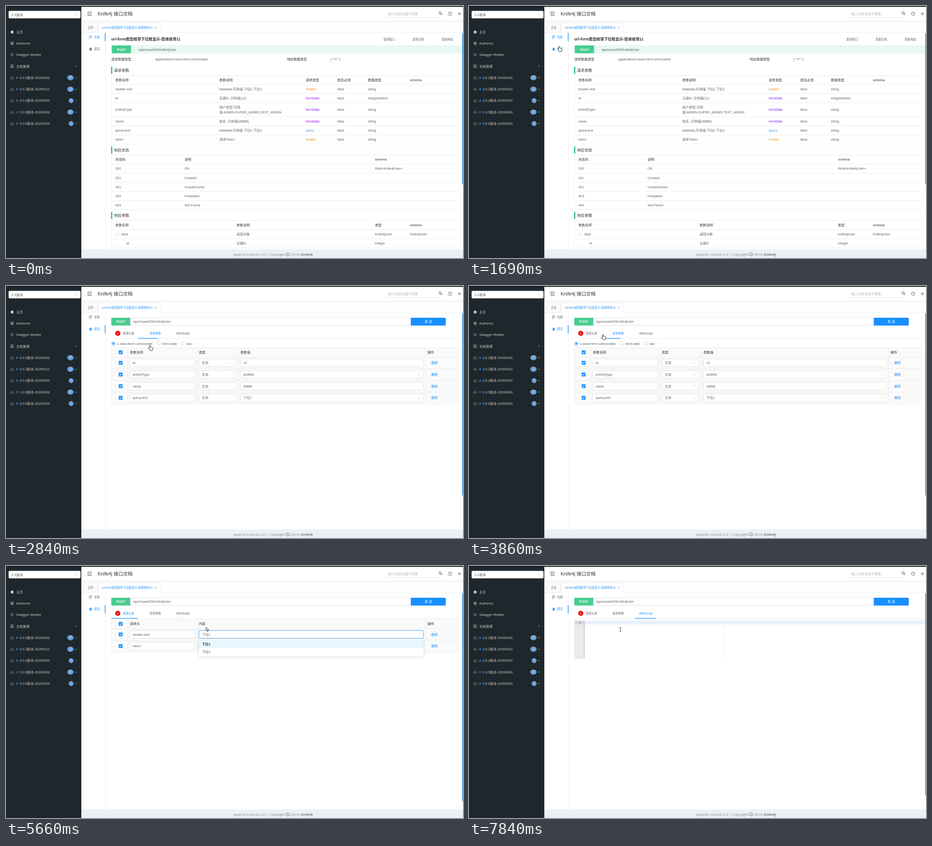
An HTML page with a canvas that plays this animation: 1007 px wide and 556 px high, repeating every 8 s.

```html
<!DOCTYPE html>
<html lang="zh-CN">
<head>
<meta charset="utf-8">
<title>Knife4j 接口文档</title>
<style>
html, body { margin: 0; width: 100%; height: 100%; overflow: hidden; background: #fff; }
canvas { display: block; width: 1007px; height: 556px; }
</style>
</head>
<body>
<canvas id="stage"></canvas>
<script>
const W = 1007, H = 556, LOOP = 8000;
const canvas = document.getElementById('stage');
const dpr = window.devicePixelRatio || 1;
canvas.width = W * dpr;
canvas.height = H * dpr;
const c = canvas.getContext('2d');

const SANS = '"Liberation Sans", "Noto Sans CJK SC", "Noto Sans CJK", sans-serif';
const FOOT = '"Open Sans", "Noto Sans", sans-serif';
const MONO = '"Liberation Mono", monospace';
const BLUE = '#1890ff', TEXT = '#606060', DARK = '#303030', LINE = '#e8e8e8', SIDE = '#c3c9cc';
const BASE = 7.35, SMALL = 6.3;

// Times of the user's actions
const OPEN_DEBUG = 1980, TO_HEADERS = 4225, TO_SCRIPT = 6515;
const DROP_OPEN = 5420, DROP_CLOSE = 6050;

// Pointer path: time, x, y, shape from this point on
const path = [
  [70, 858, 391, 'arrow'], [280, 677, 318, 'arrow'], [440, 640, 300, 'arrow'],
  [1130, 222, 105, 'hand'], [1210, 204, 92, 'hand'], [1370, 203, 83, 'hand'],
  [1530, 199, 89, 'hand'], [1980, 199, 89, 'arrow'], [2600, 310, 128, 'hand'],
  [2760, 318, 131, 'hand'], [2860, 318, 131, 'hand'], [3230, 371, 124, 'hand'],
  [3410, 371, 122, 'hand'], [3960, 279.5, 103.5, 'hand'], [4500, 279.5, 103.5, 'arrow'],
  [4950, 430, 144, 'hand'], [5030, 437, 148, 'hand'], [5500, 437, 148, 'arrow'],
  [5660, 441, 135, 'arrow'], [6100, 400, 117, 'hand'], [6200, 395, 114, 'hand'],
  [6630, 395, 114, 'arrow'], [6740, 385, 121, 'beam'], [7380, 333.5, 140, 'beam']
];

const clamp = v => Math.max(0, Math.min(1, v));
const lerp = (a, b, p) => a + (b - a) * p;
const ease = p => p < .5 ? 4 * p ** 3 : 1 - 4 * (1 - p) ** 3;
const since = (t, start, dur = 300) => ease(clamp((t - start) / dur));

function text(s, x, y, o = {}) {
  const size = o.size || BASE;
  c.font = `${o.weight || 400} ${size}px ${o.font || SANS}`;
  c.fillStyle = o.color || TEXT;
  c.textAlign = o.align || 'left';
  c.fillText(s, x, y + size * .355);
}
function rect(x, y, w, h, color) {
  c.fillStyle = color;
  c.fillRect(x, y, w, h);
}
function box(x, y, w, h, fill, stroke, r = 2, lw = .8) {
  c.beginPath();
  c.roundRect(x, y, w, h, r);
  if (fill) { c.fillStyle = fill; c.fill(); }
  if (stroke) { c.strokeStyle = stroke; c.lineWidth = lw; c.stroke(); }
}
function line(pts, color, lw = .8) {
  c.beginPath();
  for (let i = 0; i < pts.length; i += 2) c.lineTo(pts[i], pts[i + 1]);
  c.strokeStyle = color;
  c.lineWidth = lw;
  c.stroke();
}
function circle(x, y, r, fill, stroke, lw = .8) {
  c.beginPath();
  c.arc(x, y, r, 0, Math.PI * 2);
  if (fill) { c.fillStyle = fill; c.fill(); }
  if (stroke) { c.strokeStyle = stroke; c.lineWidth = lw; c.stroke(); }
}
const hline = (y, x1 = 232, x2 = 1000, color = LINE) => rect(x1, y, x2 - x1, .8, color);
const vline = (x, y1, y2, color = LINE) => rect(x, y1, .8, y2 - y1, color);
function chevron(x, y, color, turn = 0, r = 2.4) {
  const d = r / 2 * Math.cos(turn * Math.PI);
  line([x - r, y - d, x, y + d, x + r, y - d], color, .8);
}
function inPane(dx, draw) {
  c.save();
  c.beginPath();
  c.rect(231.5, 59, 773, 478);
  c.clip();
  c.translate(dx, 0);
  draw();
  c.restore();
}

function docIcon(x, y, color) {
  line([x + 1, y + 3, x - 2.6, y + 3, x - 2.6, y - 3, x + 2.6, y - 3, x + 2.6, y + 1], color);
  line([x - 1, y - 1, x + 1.4, y - 1], color, .7);
  line([x - 1, y + 1, x + 1, y + 1], color, .7);
}
function bugIcon(x, y, color) {
  box(x - 1.7, y - 1.6, 3.4, 4.6, color, null, 1.6);
  circle(x, y - 2, 1.3, color);
  for (const d of [-1, 1, 2.6]) line([x - 3, y + d, x + 3, y + d], color, .7);
}
function cloudIcon(x, y) {
  c.beginPath();
  c.arc(x - 2, y + 1, 1.7, 1.6, 4.6);
  c.arc(x, y - .4, 2.2, 3.6, 5.8);
  c.arc(x + 2, y + 1, 1.7, 4.8, 7.8);
  c.closePath();
  c.strokeStyle = '#929a9e';
  c.lineWidth = .8;
  c.stroke();
  line([x - 1, y + .6, x, y + 1.6, x + 1.2, y], '#929a9e', .7);
}

function sidebar(t) {
  rect(0, 0, 166, H, '#1e282c');
  box(6, 11, 158, 16, '#fff', '#d9d9d9');
  text('2.X版本', 12, 19);
  chevron(154.5, 19, '#bbb');

  c.beginPath();
  [9.5, 57, 13.5, 53.3, 17.5, 57, 16.3, 57, 16.3, 60.5, 10.7, 60.5, 10.7, 57]
    .forEach((v, i, a) => i % 2 || c.lineTo(v, a[i + 1]));
  c.fillStyle = SIDE;
  c.fill();
  circle(13.5, 82.3, 3.3, null, SIDE);
  box(12, 81.2, 3, 2.6, SIDE, null, .4);
  circle(13.5, 107.5, 3, null, '#8f979b');
  circle(13.5, 107.5, 1.1, null, '#8f979b');
  docIcon(13, 132.8, SIDE);
  circle(15.6, 135, 1.5, null, SIDE, .7);

  ['主页', 'Authorize', 'Swagger Models', '文档管理'].forEach((s, i) =>
    text(s, 22.5, 57 + i * 25.3, { color: SIDE }));
  chevron(154, 132.8, SIDE, 0, 2);

  const versions = [['2.0.2', '20200226', 29], ['2.0.3', '20200312', 15], ['2.0.4', '20200620', 3],
    ['2.0.5', '20200809', 20], ['2.0.6', '20200919', 3]];
  const p = t % 1200 / 1200;
  versions.forEach(([v, date, n], i) => {
    const y = 158.2 + i * 25.3, w = n > 9 ? 12.4 : 9.6;
    cloudIcon(13.5, y);
    c.globalAlpha = .5 * (1 - p);
    circle(24.5, y, 1.3 + 2.2 * p, null, BLUE, .7);
    c.globalAlpha = 1;
    circle(24.5, y, 1.7, BLUE);
    text(`${v}版本-${date}`, 30, y, { color: SIDE });
    box(148.2 - w, y - 4.8, w, 9.6, '#4490dc', '#fff', 4.8, .7);
    text(n, 148.2 - w / 2, y, { size: SMALL, color: '#fff', align: 'center' });
    chevron(154, y, SIDE, 0, 2);
  });
}

function header() {
  rect(166, 0, W - 166, H, '#fff');
  hline(33, 166, W, '#dfe1e3');
  rect(166, 33.8, W - 166, 2, '#f6f7f8');
  for (const y of [13.5, 17, 20.5]) line([y === 17 ? 183 : 179.5, y, 189, y], '#444', 1);
  line([182, 15.3, 179.8, 17, 182, 18.7], '#444', 1);
  text('Knife4j 接口文档', 202, 17, { size: 10.5, color: '#333' });
  text('输入文档关键字搜索', 842, 17, { color: '#b8b8b8' });
  hline(25, 842, 952, '#ddd');
  circle(956.5, 15.3, 2.6, null, '#444', 1);
  line([958.4, 17.2, 961, 20], '#444', 1.1);
  circle(978.5, 17, 4, null, '#555', .8);
  text('?', 978.5, 17, { size: 6, color: '#444', align: 'center' });
  text('中', 995.5, 17, { color: '#444' });

  hline(57.5, 166, W);
  box(171.4, 37.4, 31, 20.6, '#fafafa', LINE, [2, 2, 0, 0]);
  text('主页', 180, 47.5, { size: SMALL });
  box(203.4, 37.4, 137, 21, '#fff', LINE, [2, 2, 0, 0]);
  rect(203.8, 57, 136.2, 2, '#fff');
  text('url-form类型枚举下拉框显示-简单枚举11', 211, 47.5, { size: SMALL, color: BLUE });
  line([328.3, 45.5, 332.1, 49.3], '#888', .7);
  line([332.1, 45.5, 328.3, 49.3], '#888', .7);
}

function sideTabs(t) {
  const debug = t >= OPEN_DEBUG, hover = t >= 1210;
  const a = debug ? TEXT : BLUE, b = hover ? BLUE : TEXT;
  vline(218.6, 59, 537);
  docIcon(186.5, 68.7, a);
  text('文档', 194, 68.7, { size: SMALL, color: a });
  bugIcon(186.5, 95, b);
  text('调试', 194, 95, { size: SMALL, color: b });
  rect(217.8, lerp(59.5, 86, since(t, OPEN_DEBUG - 60)), 1.4, 18.3, BLUE);
}

function section(s, y) {
  rect(232, y - 8, 2, 15.6, '#00ab6d');
  text(s, 238, y, { size: 8.4, color: DARK });
}
function table(top, lines, cols, head, headY, rows) {
  hline(top);
  lines.forEach(y => hline(y));
  vline(232, top, Math.min(537, lines[lines.length - 1]));
  head.forEach((s, i) => text(s, cols[i], headY, { color: DARK }));
  for (const [y, ...cells] of rows) cells.forEach((s, i) => text(s, cols[i], y));
}

function docPage() {
  text('url-form类型枚举下拉框显示-简单枚举11', 232, 73.5, { size: 8.4, weight: 700, color: DARK });
  ['复制接口', '复制文档', '复制地址'].forEach((s, i) => text(s, 831.5 + i * 64.4, 73.5, { size: SMALL }));
  rect(232, 86.5, 775, 18.5, '#e9f8f1');
  box(233, 87, 42.5, 17.3, '#49cc90', null, 1.5);
  text('POST', 254.2, 96, { weight: 700, color: '#fff', align: 'center' });
  text('/api/nxew202/Knife4jUser', 292, 96);
  text('请求数据类型', 232, 117.5, { color: DARK });
  text('application/x-www-form-urlencoded', 329, 117.5);
  text('响应数据类型', 619, 117.5, { color: DARK });
  text('[ "*/*" ]', 715, 117.5);

  section('请求参数', 142);
  const kinds = { header: '#f29019', formData: '#9012fe', query: '#3f97ea' };
  const params = [
    [183, 'header-test', 'balabala,可用值:下拉1,下拉2', 'header', 'string'],
    [203, 'id', '主键id ,示例值(12)', 'formData', 'integer(int64)'],
    [228.7, 'knife4jType', '', 'formData', 'string'],
    [254.3, 'name', '姓名 ,示例值(ABBB)', 'formData', 'string'],
    [274.4, 'query-test', 'balabala,可用值:下拉1,下拉2', 'query', 'string'],
    [294.5, 'token', '请求Token', 'header', 'string']
  ];
  table(153, [173, 193, 213, 244, 264, 284.3, 304.3], [241, 470, 660.5, 730, 797.5, 890],
    ['参数名称', '参数说明', '请求类型', '是否必须', '数据类型', 'schema'], 163,
    params.map(([y, name, note, , type]) => [y, name, note, '', 'false', type]));
  params.forEach(p => text(p[3], 660.5, p[0], { color: kinds[p[3]] }));
  text('用户类型,可用', 470, 223.3);
  text('值:ADMIN,SUPER_ADMIN,TEST_ADMIN', 470, 234.3);

  section('响应状态', 317.8);
  table(328.5, [348.6, 368.7, 388.8, 408.9, 429, 449], [241, 393.5, 813],
    ['状态码', '说明', 'schema'], 338.8,
    [[358.8, '200', 'OK', 'Rest«Knife4jUser»'], [378.9, '201', 'Created'], [399, '401', 'Unauthorized'],
      [419, '403', 'Forbidden'], [439, '404', 'Not Found']]);

  section('响应参数', 462.4);
  table(473, [493.3, 513.4, 533.5, 537], [241, 508, 813, 890],
    ['参数名称', '参数说明', '类型', 'schema'], 483.3,
    [[503.5, '', '返回对象', 'Knife4jUser', 'Knife4jUser'], [523.5, '', '主键id', 'integer']]);
  box(241.2, 499.9, 8.6, 8.4, '#fff', LINE, 1);
  text('+', 245.5, 504, { size: 5, align: 'center' });
  text('data', 254, 503.5);
  text('id', 265, 523.5);
}

function checkbox(y) {
  box(248.4, y - 4.2, 8.5, 8.5, BLUE, null, 1);
  line([250.4, y, 252, y + 1.8, 255, y - 1.8], '#fff', 1.1);
}
function field(s, x1, x2, y, o = {}) {
  box(x1, y - 8.5, x2 - x1, 17, '#fff', o.border || '#d9d9d9', 2);
  text(s, x1 + 6.5, y, { color: o.color });
  if (o.select) chevron(x2 - 9.5, y, '#bbb', o.turn || 0);
}
function grid(top, lines, cols) {
  const end = lines[lines.length - 1];
  rect(232, top, 768, end - top, '#fafafa');
  hline(top);
  lines.forEach(y => hline(y));
  [232, ...cols].forEach(x => vline(x, top, end));
}
function removeLink(y) {
  text('删除', 937, y, { color: BLUE });
}

function paramsPane() {
  ['x-www-form-urlencoded', 'form-data', 'raw'].forEach((s, i) => {
    const x = [236.5, 336.5, 389][i];
    circle(x, 127, 3.9, '#fff', i ? '#d0d0d0' : BLUE);
    if (!i) circle(x, 127, 2.1, BLUE);
    text(s, x + 8.2, 127);
  });
  grid(136, [156.8, 182.2, 208, 233.8, 259.6], [267.8, 420.6, 512, 924]);
  checkbox(146.2);
  ['参数名称', '类型', '参数值', '操作'].forEach((s, i) =>
    text(s, [273, 425, 516.5, 928.5][i], 146.2, { color: DARK }));
  [['id', '12'], ['knife4jType', 'ADMIN', 1], ['name', 'ABBB'], ['query-test', '下拉1', 1]].forEach(([k, v, select], i) => {
    const y = 169.4 + i * 25.8;
    checkbox(y);
    field(k, 272.5, 416, y);
    field('文本', 425.2, 507, y, { select: 1 });
    field(v, 516.5, 919.6, y, { select });
    removeLink(y);
  });
}

function headersPane(t) {
  const turn = since(t, DROP_OPEN) - since(t, DROP_CLOSE);
  const focus = t >= DROP_OPEN && t < DROP_CLOSE + 100, hover = t >= 5030 && t < 5560;
  grid(118, [138, 163.6, 189.4], [267.8, 420.6, 924]);
  checkbox(127.8);
  ['请求头', '内容', '操作'].forEach((s, i) =>
    text(s, [273, 425, 928.5][i], 127.8, { color: DARK }));
  ['header-test', 'token'].forEach((s, i) => {
    const y = 151 + i * 25.7;
    checkbox(y);
    field(s, 272.5, 416, y);
    removeLink(y);
  });
  if (focus) box(424.7, 142, 495.4, 18, null, 'rgba(24,144,255,.25)', 2.5, 1.6);
  field('下拉1', 425.2, 919.6, 151, { select: 1, turn, border: focus || hover ? '#40a9ff' : null });
  field('请求头内容', 425.2, 919.6, 176.7, { color: '#bcbcbc' });
}

function dropdown(t) {
  const p = since(t, DROP_OPEN, 200) - since(t, DROP_CLOSE, 200);
  if (p <= 0) return;
  c.save();
  c.globalAlpha = p;
  c.translate(0, 161.5);
  c.scale(1, lerp(.8, 1, p));
  c.translate(0, -161.5);
  c.save();
  c.shadowColor = 'rgba(0,0,0,.18)';
  c.shadowBlur = 5 * dpr;
  c.shadowOffsetY = dpr;
  box(425, 161.7, 495, 38, '#fff', null);
  c.restore();
  rect(425, 163.6, 495, 17, '#e6f7ff');
  text('下拉1', 431.7, 172, { weight: 600, color: '#454545' });
  text('下拉2', 431.7, 189);
  c.restore();
}

function scriptPane(t) {
  rect(232, 120.3, 22, 84.7, '#ebebeb');
  rect(232, 120.3, 22, 8.6, '#dadada');
  rect(254, 120.3, 751, 8.6, '#e8f2fe');
  vline(560.2, 120.3, 205);
  vline(253.6, 120.3, 205, '#9a9a9a');
  text('1', 245, 124.6, { size: SMALL, font: MONO, align: 'center', color: '#555' });
  if (t >= 7340 && t < 7840) vline(256.4, 120.3, 128.9, '#222');
}

function debugPage(t) {
  box(232, 70, 42, 17.2, '#49cc90', null, [2, 0, 0, 2]);
  text('POST', 253, 78.7, { weight: 700, color: '#fff', align: 'center' });
  box(274, 70.4, 618, 16.6, '#fff', '#d9d9d9', 0);
  text('/api/nxew202/Knife4jUser', 280, 78.7);
  box(892, 70, 77, 17.2, BLUE, null, [0, 2, 2, 0]);
  text('发 送', 930.5, 78.7, { color: '#fff', align: 'center' });

  const tab = t < TO_HEADERS ? 1 : t < 6650 ? 0 : 2;
  circle(246.3, 104.4, 5.6, '#f20000');
  text('2', 246.3, 104.4, { size: SMALL, color: '#fff', align: 'center' });
  ['请求头部', '请求参数', 'AfterScript'].forEach((s, i) => {
    const hover = i === 0 && t >= 3900 && t < TO_HEADERS;
    text(s, [257, 316, 375][i], 104.4, { size: SMALL, color: i === tab || hover ? BLUE : TEXT });
  });
  hline(115.2);
  const a = since(t, TO_HEADERS), b = since(t, TO_SCRIPT);
  const inkX = lerp(lerp(291, 232, a), 366, b);
  const inkW = t < TO_HEADERS ? 42.5 : t < TO_SCRIPT ? 59 : 47;
  rect(inkX, 114.8, inkW, 1.3, BLUE);

  if (t < TO_HEADERS) inPane(0, paramsPane);
  else if (t < TO_SCRIPT) inPane(-769 * (1 - a), () => headersPane(t));
  else inPane(1538 * (1 - b), () => scriptPane(t));
  dropdown(t);
}

function footer() {
  rect(166, 537, W - 166, 19, '#ecf0f4');
  const o = { size: 7.9, font: FOOT, color: '#7d8185' };
  text('Apache License 2.0 | Copyright', 501.3, 548, o);
  circle(621.3, 548, 3.7, null, '#555', .8);
  text('c', 621.3, 547.6, { size: 6, color: '#555', align: 'center' });
  text('2019-', 628, 548, o);
  text('Knife4j', 649.5, 548, { ...o, weight: 600, color: '#5c6064' });
}

function pointer(t) {
  if (t < path[0][0]) return;
  let i = path.length - 1;
  while (path[i][0] > t) i--;
  const k = path[i], n = path[i + 1] || k;
  const p = n === k ? 0 : (t - k[0]) / (n[0] - k[0]);
  c.save();
  c.translate(lerp(k[1], n[1], p), lerp(k[2], n[2], p));
  c.lineJoin = 'round';
  if (k[3] === 'beam') {
    line([-2, -4.5, 0, -4, 2, -4.5], '#222');
    line([-2, 4.5, 0, 4, 2, 4.5], '#222');
    line([0, -4, 0, 4], '#222', .9);
  } else {
    const shape = k[3] === 'arrow'
      ? 'M0 0V8.3L1.9 6.5L3.2 9.6L4.5 9L3.2 6H5.8Z'
      : 'M-1.5 .4Q-.6 -1 .4 .4V4Q1.6 3.3 2.3 4.3Q3.4 3.6 4 4.7Q5.4 4.2 5.6 5.6V8L4.6 10.2V11.6H-.8V10.3L-4 6.4Q-3.8 4.9 -1.5 6.3Z';
    const shapePath = new Path2D(shape);
    c.fillStyle = '#fff';
    c.fill(shapePath);
    c.strokeStyle = '#222';
    c.lineWidth = .9;
    c.stroke(shapePath);
  }
  c.restore();
}

function scrollbar(t) {
  const end = t < OPEN_DEBUG ? 393 : t < 4250 ? 462 : t < 6590 ? 519 : t < 6660 ? 488 : 506;
  rect(1005.4, 60, 1.6, end - 60, '#2b8fd8');
}

function draw(t) {
  c.setTransform(dpr, 0, 0, dpr, 0, 0);
  header();
  sideTabs(t);
  if (t < OPEN_DEBUG) docPage();
  else debugPage(t);
  footer();
  scrollbar(t);
  sidebar(t);
  rect(0, 0, W, 1.8, '#12171a');
  pointer(t);
}

const start = performance.now();
function tick(now) {
  draw(Math.max(0, now - start) % LOOP);
  requestAnimationFrame(tick);
}
draw(0);
requestAnimationFrame(tick);
</script>
</body>
</html>
```
